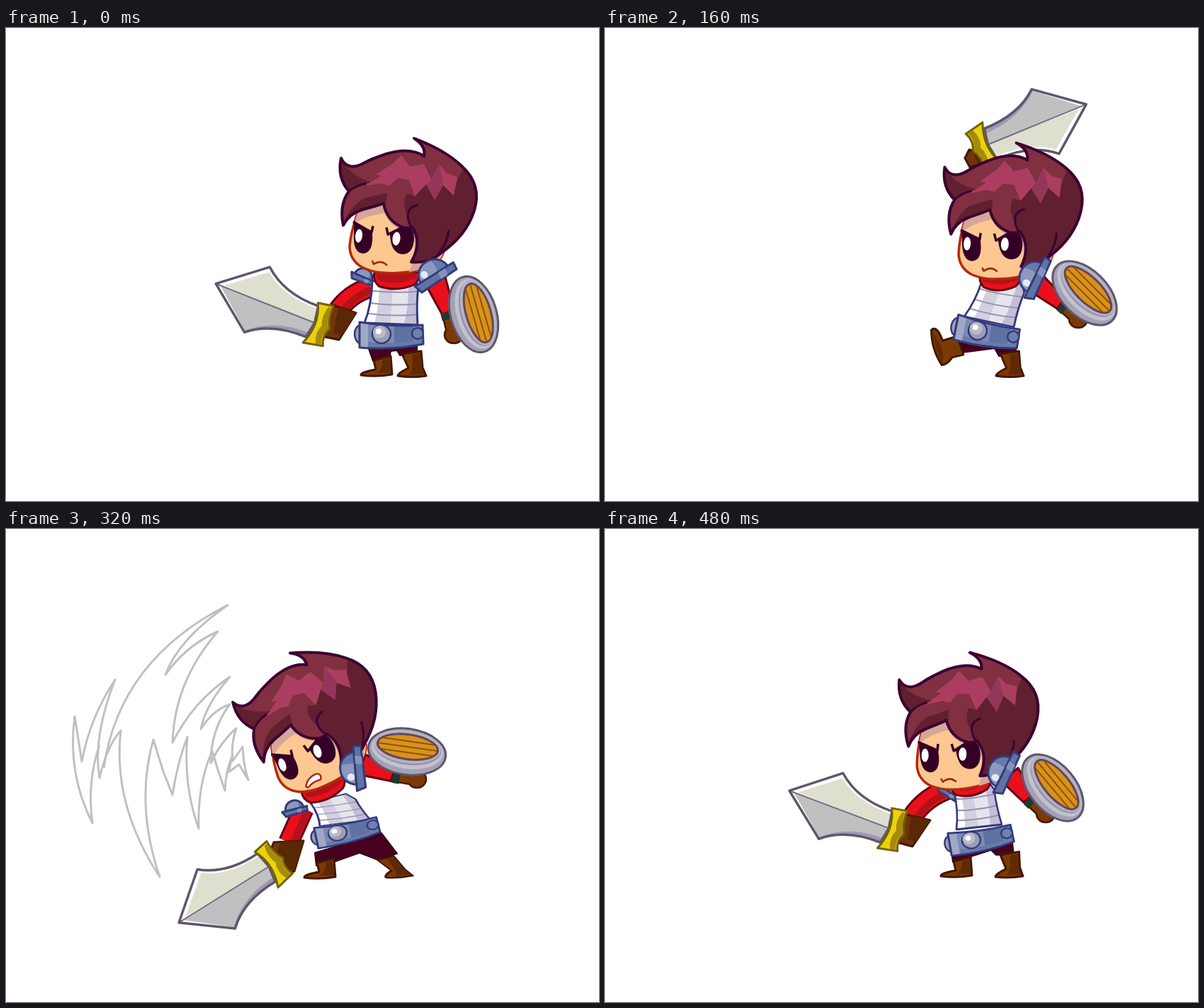
These frames come from a looping animation (837x669 px, 0.56 s). An HTML page with a canvas:

```html
<!DOCTYPE html>
<html lang="en">
<head>
<meta charset="utf-8">
<title>Sword swing</title>
<style>
  html, body { margin: 0; width: 100%; height: 100%; overflow: hidden; background: #fff; }
  canvas { display: block; }
</style>
</head>
<body>
<canvas id="stage" width="837" height="669"></canvas>
<script>
const ctx = document.getElementById('stage').getContext('2d');
const STEP = 80;
const NAVY = '#343a7c', PLUM = '#3d0033', STEEL = '#60556a', LEATHER = '#451603';

function ink(d, fill, line, width = 3) {
  const path = new Path2D(d);
  if (fill) { ctx.fillStyle = fill; ctx.fill(path); }
  if (line) { ctx.strokeStyle = line; ctx.lineWidth = width; ctx.stroke(path); }
}

function oval(x, y, rx, ry, fill, line, width = 2.5, turn = 0) {
  ctx.beginPath();
  ctx.ellipse(x, y, rx, ry, turn, 0, Math.PI * 2);
  if (fill) { ctx.fillStyle = fill; ctx.fill(); }
  if (line) { ctx.strokeStyle = line; ctx.lineWidth = width; ctx.stroke(); }
}

function at([x, y, deg = 0, sx = 1, sy = 1], draw, pivot = [0, 0]) {
  ctx.save();
  ctx.translate(x, y);
  ctx.rotate(deg * Math.PI / 180);
  ctx.scale(sx, sy);
  ctx.translate(-pivot[0], -pivot[1]);
  draw();
  ctx.restore();
}

function clipped(d, draw) {
  ctx.save();
  ctx.clip(new Path2D(d));
  draw();
  ctx.restore();
}

// Affine map that carries three rest points onto three posed points.
function warp(a, b, draw) {
  const u = [a[2] - a[0], a[3] - a[1]], v = [a[4] - a[0], a[5] - a[1]];
  const det = u[0] * v[1] - u[1] * v[0];
  const row = i => {
    const p = b[2 + i] - b[i], q = b[4 + i] - b[i];
    const m = (p * v[1] - q * u[1]) / det, n = (q * u[0] - p * v[0]) / det;
    return [m, n, b[i] - m * a[0] - n * a[1]];
  };
  const X = row(0), Y = row(1);
  ctx.save();
  ctx.transform(X[0], Y[0], X[1], Y[1], X[2], Y[2]);
  draw();
  ctx.restore();
}

const HAIR = 'M473 184Q467 212 484 231Q470 250 476 279Q484 263 502 257Q522 252 533 248' +
  'Q537 273 560 282Q568 284 573 281Q588 303 572 331Q598 333 613 319Q650 294 661 258' +
  'Q672 222 644 196Q621 173 576 156Q593 167 590 181Q570 168 537 178Q516 185 507 190Q482 204 473 184Z';
const FACE = 'M496 262Q487 288 485 308Q485 328 502 338Q516 345 530 346Q566 349 592 339Q612 334 617 318L605 270L540 245Z';

function face(gritted) {
  ink(FACE, '#fdc791', '#b5290c', 3.5);
  clipped(FACE, () => {
    ink('M484 284Q500 266 535 262Q543 285 572 289Q584 318 566 350L625 350L620 250L480 240Z', '#d5a69a');
    ink('M588 334Q606 330 618 314L620 345L585 345Z', '#e9b795');
  });
  ink('M491 275L517 290Q519 318 504 319Q489 318 491 289Z', '#350026');
  ink('M540 292L557 283Q576 276 576 298Q575 320 559 320Q543 318 542 292Z', '#350026');
  ink('M490 274L516 289L518 280M537 282L539 292L559 282', null, '#350026', 3.5);
  oval(498, 294, 5, 9.5, '#fff', null, 0, 0.12);
  oval(551, 298, 5.5, 9.5, '#fff', null, 0, 0.12);
  if (gritted) ink('M515 336Q522 325 536 326Q543 329 538 336Q526 334 519 338Q515 339 515 336Z', '#fff', '#b5290c', 2.5);
  else ink('M517 329L519 334Q530 327 538 336', null, '#a02408', 2.5);
}

function hair() {
  ink(HAIR, '#803040');
  clipped(HAIR, () => {
    const dark = '#61202f';
    ink('M652 190Q634 212 632 237L617 222L605 243L593 221L577 238L566 234Q558 250 566 264Q568 276 574 284Q588 305 568 336L625 330L680 250Z', dark);
    ink('M470 180Q483 210 520 219Q496 219 484 232L465 225Z', dark);
    ink('M472 285Q484 253 505 241L538 233L536 249Q500 254 472 285Z', dark);
    ink('M506 223L530 209L522 207L546 192L558 180L570 196L590 192L600 214L612 193L622 205L637 211L632 237L617 222L605 243L593 221L577 238L569 215L553 212L541 223L530 220Z', '#ab3e60');
    ink('M593 221L600 214L612 193L617 222L605 243Z', '#93365a');
  });
  ink('M484 231Q494 222 509 220M582 250Q564 254 568 272Q570 280 574 284M625 286Q623 304 610 320', null, PLUM, 3);
  ink(HAIR, null, PLUM, 4);
}

function torso() {
  const shirt = 'M517 358Q516 392 506 417L581 420Q579 390 582 366L574 350Z';
  ink(shirt, '#e6e5ec');
  clipped(shirt, () => {
    ink('M500 340L528 340Q528 395 518 425L500 425Z', '#fff');
    ink('M528 340L548 340L542 425L518 425Q528 395 528 340Z', '#d2d0de');
    ink('M568 340L595 340L590 425L560 425Q570 395 568 340Z', '#c3bdd6');
    ink('M510 371Q548 376 590 372M508 388Q545 394 585 390M505 403Q545 409 585 405', null, '#9590b4', 2);
  });
  ink(shirt, null, NAVY);
}

function belt() {
  const strap = 'M499 416Q545 423 588 420L589 447Q545 456 499 452Z';
  oval(501, 433, 9, 13, '#9a9eb8', NAVY);
  ink(strap, '#7d8bb4');
  clipped(strap, () => {
    ink('M548 410L575 410L575 460L548 460Z', '#5d72a3');
    ink('M498 442Q545 450 590 440L590 460L498 460Z', '#687ba9');
    ink('M499 410L511 410L511 460L499 460Z', '#a0a8c4');
  });
  ink(strap, null, NAVY);
  oval(530, 433, 13, 13, '#9c9db4', NAVY);
  oval(527, 430, 9, 9, '#b9bac8');
  oval(526, 429, 4, 4, '#fff');
  oval(581, 432, 8, 8, '#6f80ae', NAVY);
}

function scarf() {
  ink('M-31 -16L33 -16Q32 -4 25 1Q0 12 -25 3Q-34 -6 -31 -16Z', '#e9101b', '#620014');
  ink('M-27 -6Q0 4 28 -8L27 -16L-29 -16Z', '#b41218');
}

function bootLeft() {
  ink('M519 470L543 464L545 490Q522 494 501 491Q500 487 522 483Z', '#7b3a05', LEATHER);
  ink('M531 470L541 467L543 488L524 488Q532 480 531 470Z', '#5f2a03');
}

function bootKick() {
  ink('M489 415Q498 409 503 432L524 428L530 455L514 457Q505 467 498 466Q486 442 489 415Z', '#7b3a05', LEATHER);
  ink('M491 420Q492 448 499 463Q504 450 498 434Z', '#5f2a03');
}

function bootRight() {
  ink('M559 461L586 457L588 480L593 492Q572 495 553 492Q553 488 568 481Z', '#7b3a05', LEATHER);
  ink('M573 462L584 460L586 480L590 490L570 490Q576 476 573 462Z', '#5f2a03');
}

function pauldron(half, dome) {
  const cap = `M${-dome} -2C${-dome} ${-dome * 1.5} ${dome} ${-dome * 1.5} ${dome} -2Z`;
  ink(cap, '#8b98bf');
  clipped(cap, () => ink(`M2 -40L40 -40L40 0L6 0Q10 -20 2 -40Z`, '#6779a8'));
  ink(cap, null, NAVY);
  if (dome > 15) oval(-12, -12, 5, 5.5, '#e6e9f5');
  const t = half / 6;
  ink(`M${-half} ${-t}L${half} ${-t}L${half - 1} ${t}L${-half + 4} ${t + 2}Z`, '#5f73a4', NAVY);
  ink(`M${half * .2} ${-t + 1}L${half * .55} ${-t + 1}L${half * .5} ${t}L${half * .15} ${t}Z`, '#8593bd');
}

function shield() {
  oval(0, 0, 55, 32.5, '#a3a2b5', STEEL, 3);
  oval(0, -3, 51, 27, '#c2c2cc');
  oval(0, -5.5, 48, 24, '#9a8fb2');
  oval(-1, -7, 48, 23, '#b4b3c2');
  oval(0, -7, 43, 17.5, '#d89219', '#65465a', 3);
  ctx.save();
  ctx.beginPath();
  ctx.ellipse(0, -7, 42, 16.5, 0, 0, Math.PI * 2);
  ctx.clip();
  ink('M-45 -15L45 -15M-45 -7L45 -7M-45 1L45 1', null, '#8d5207', 2);
  ctx.restore();
}

const BLADE = 'M-158 0L-96 -50Q-64 -22 -12 -24L-8 0L-12 23Q-64 22 -95 49Z';
const GUARD = 'M-14 -28L8 -32Q7 -12 15 0Q8 12 15 26L-13 32Q0 0 -14 -28Z';

function sword() {
  ink(BLADE, '#fff');
  ink('M-146 -2L-94 -43Q-64 -18 -11 -20L-8 0Z', '#dfdfd0');
  ink('M-150 1L-8 0L-11 22Q-64 21 -95 47Z', '#c0c0c0');
  ink('M-95 49Q-64 22 -12 23L-11 16Q-62 16 -95 46Z', '#a098b4');
  ink('M-157 0L-8 0', null, '#756c80', 2);
  ink(BLADE, null, STEEL, 3.5);
  ink(GUARD, '#ead20e', '#75600a');
  ink('M2 -28L6 -29Q6 -12 13 0Q6 12 12 25L4 27Q-3 12 3 0Q-3 -12 2 -28Z', '#a68a0a');
}

function ghost() {
  ink('M-14 -28L12 -30L12 -16Q28 -16 24 -4Q32 6 18 12L12 28L-13 30Q0 0 -14 -28Z', '#e0c114');
  ink(BLADE, '#fff', '#c0c0c0', 3.5);
  ink('M-157 0L-8 0', null, '#c0c0c0', 2.5);
}

function swordArm(d) {
  ink(d, null, '#620014', 30);
  ink(d, null, '#e9101b', 24);
  at([6, 2], () => ink(d, null, '#b41218', 10));
}

function shieldArm([sx, sy, cx, cy, hx, hy]) {
  const len = Math.hypot(cx - sx, cy - sy), k = 0.3;
  const deg = Math.atan2(cy - sy, cx - sx) * 180 / Math.PI;
  ink(`M${cx} ${cy}L${hx} ${hy}`, null, LEATHER, 20);
  oval(hx, hy, 13, 12, '#7b3a05', LEATHER);
  ink(`M${cx} ${cy}L${hx} ${hy}`, null, '#7b3a05', 15);
  at([sx, sy, deg], () => ink(`M-6 -15L${len} -9L${len} 9L-6 15Z`, '#e9101b', '#620014'));
  ink(`M${cx} ${cy}l${(hx - cx) * k} ${(hy - cy) * k}`, null, '#20382f', 22);
}

function sweep() {
  ink('M314 107Q160 185 138 338M314 107Q244 155 225 206Q255 164 299 145Q238 215 235 302' +
    'Q264 244 316 209Q282 248 275 283Q292 256 316 248Q289 284 289 331Q304 300 325 282' +
    'Q317 305 320 328L334 308Q335 335 342 355L329 333L314 344L320 319Q310 342 309 370' +
    'Q299 342 291 314Q270 362 272 424Q250 362 256 294Q242 330 235 376L222 343L208 298' +
    'Q182 390 217 492Q150 390 162 285Q142 308 132 352Q122 295 154 213Q118 268 107 329' +
    'L97 265Q86 345 122 416Q114 358 132 305', null, '#c0c0c0');
}

function splash() {
  ink('M212 417Q240 468 275 488Q283 455 272 425Q288 464 318 486Q309 455 315 424Q326 470 356 499' +
    'Q320 492 300 478Q324 530 361 563Q285 548 252 494Q256 520 271 540Q224 490 212 417Z', '#fff', '#c0c0c0');
  ink('M357 400Q366 422 378 424Q386 412 382 401Q390 415 404 418L388 422Q390 435 397 449Q368 440 357 400Z', '#fff', '#c0c0c0');
}

const TORSO = [517, 364, 506, 417, 581, 420];
const BOOT = [559, 461, 553, 492, 593, 493];

const poses = [
  { head: [500.5, 258.5], torso: TORSO, belt: [530, 433], scarf: [551, 362],
    pants: 'M510 448L580 448L580 461L556 463L552 456L543 457L541 468L518 471Z', left: [0, 0], right: BOOT,
    sleeve: 'M514 367Q484 376 467 402', glove: 'M459 391L494 403L470 441L450 437Z', sword: [443, 420, 21.7],
    arm: [608, 362, 624, 402, 632, 434], shield: [660, 405, 74], near: [607, 353, -32], far: [503, 355, 24] },
  { head: [562.5, 248.5, 0, 1, 1.045], torso: [565, 355, 539, 400, 606, 417], belt: [553, 421, 14], scarf: [594, 351, 3, .9],
    pants: 'M529 438L606 444L605 459L576 461L573 453L530 451Z', kick: [489, 414], right: [580, 460, 573, 492, 612, 493],
    glove: 'M600 143L625 139L625 162L596 160Z', sword: [630, 139, 176.7, 1.03], raised: true,
    arm: [650, 363, 680, 393, 695, 420], shield: [712, 383, 62], near: [650, 351, -53] },
  { head: [511.5, 269.5, -3.5], torso: [531, 362, 507, 408, 577, 423], belt: [526, 428, 11], scarf: [557, 364, 1, .9],
    pants: 'M502 446L580 446L580 460L556 464L550 453L504 459Z', kick: [460.5, 426, -6.5], right: [558, 461, 552, 492, 591, 493],
    glove: 'M514 172L540 180L530 192L515 197L508 184Z', sword: [533, 168, 157.7], raised: true,
    arm: [610, 362, 644, 390, 668, 412], shield: [677, 375, 45], near: [611, 355, -64] },
  { head: [348, 315.5, -28], gritted: true, torso: [409, 392, 421, 428, 495, 416], belt: [448, 433, -11, 1, .82], scarf: [430, 382, -24],
    pants: 'M411 462Q440 450 500 430L535 461L510 468L484 460L440 471L414 478Z', left: [-103, 3], right: [507, 470, 518, 493, 558, 492],
    sleeve: 'M398 398L386 444', glove: 'M365 447L370 440L406 439L403 472L362 462Z', sword: [378, 476, -68],
    arm: [488, 342, 535, 325, 561, 311], shield: [532, 286, -24], near: [479, 344, -114], far: [385, 399, -24],
    ghosts: [[343, 253, 48, 1.02, 1.02], [287, 359, 7.5, 1.19, .95]] },
  { head: [377, 300.5, -25.5], gritted: true, torso: [432, 390, 443, 420, 514, 411], belt: [468, 430, -12, 1, .82], scarf: [452, 375, -22],
    pants: 'M436 458L530 430L552 459L525 468L499 458L465 470L438 476Z', left: [-80, 2], right: [524, 468, 536, 493, 575, 491],
    sleeve: 'M420 396L399 443', glove: 'M378 443L420 441L407 484L390 490L370 462Z', sword: [378, 473, -32],
    arm: [508, 335, 546, 348, 580, 354], shield: [566, 315, 8], near: [498, 338, -95], far: [408, 399, -14], effect: sweep },
  { head: [411, 295, -20.3], gritted: true, torso: [460, 387, 471, 418, 540, 406], belt: [498, 429, -16, 1, .82], scarf: [477, 374, -22],
    pants: 'M464 456L550 426L566 456L540 468L516 457L490 470L464 470Z', left: [-54, 2], right: [541, 469, 544, 492, 584, 491],
    sleeve: 'M453 386L424 432', glove: 'M404 425L443 430L424 468L405 460Z', sword: [405, 455, -19.3],
    arm: [540, 344, 573, 365, 602, 380], shield: [600, 341, 28], near: [531, 342, -79], far: [435, 385, -12], effect: splash },
  { head: [450.5, 284.5, -6], torso: [494, 375, 496, 425, 560, 418], belt: [517, 440, -10, 1, .9], scarf: [517, 370, -8, .9],
    pants: 'M489 454L575 444L577 460L552 461L545 454L517 463L515 470L491 471Z', left: [-27, 0], right: [558, 461, 551, 492, 590, 492],
    sleeve: 'M490 366Q452 378 433 408', glove: 'M421 403L459 412L434 449L415 444Z', sword: [408, 426, 20.7],
    arm: [575, 352, 598, 381, 622, 403], shield: [632, 366, 50], near: [567, 346, -64], far: [484, 374, 35] }
];

function weapon(p) {
  ink(p.glove, '#70350a', LEATHER);
  clipped(p.glove, () => at([12, -5], () => ink(p.glove, '#5a2804')));
  at(p.sword, sword);
}

function draw(p) {
  ctx.fillStyle = '#fff';
  ctx.fillRect(0, 0, 837, 669);
  ctx.lineJoin = 'round';
  if (p.raised) weapon(p);
  ink(p.pants, '#480021', '#33001c', 2);
  if (p.kick) at(p.kick, bootKick, [489, 414]);
  else at(p.left, bootLeft);
  warp(BOOT, p.right, bootRight);
  shieldArm(p.arm);
  if (p.sleeve) swordArm(p.sleeve);
  if (p.far) at(p.far, () => pauldron(18, 13));
  warp(TORSO, p.torso, torso);
  at(p.belt, belt, [530, 433]);
  at(p.scarf, scarf);
  at(p.head, () => { face(p.gritted); hair(); }, [500.5, 258.5]);
  at(p.near, () => pauldron(32, 23));
  at(p.shield, shield);
  if (!p.raised) weapon(p);
  (p.ghosts || []).forEach(g => at(g, ghost));
  if (p.effect) p.effect();
}

let start = null, shown = 0;
draw(poses[0]);
function tick(now) {
  if (start === null) start = now;
  const i = Math.floor((now - start) / STEP) % poses.length;
  if (i !== shown) draw(poses[shown = i]);
  requestAnimationFrame(tick);
}
requestAnimationFrame(tick);
</script>
</body>
</html>
```
